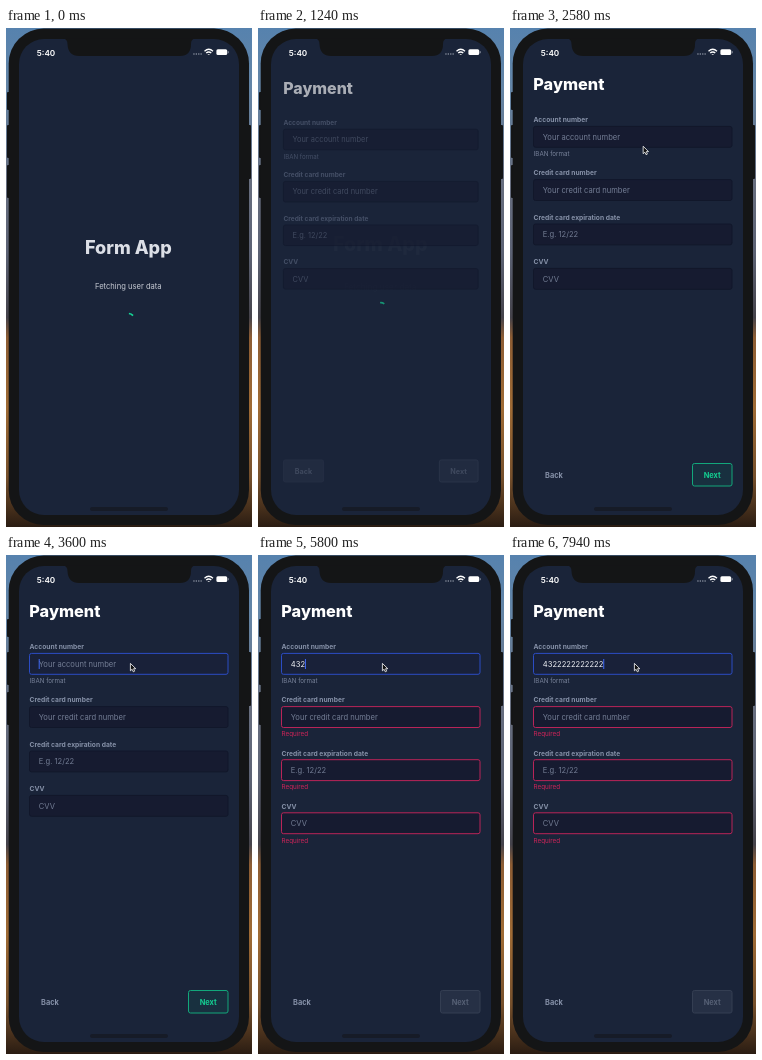
Animation of 246x499 px, one loop 8 s. Source, as an HTML page:

```html
<!DOCTYPE html>
<html lang="en">
<head>
<meta charset="utf-8">
<title>Payment form</title>
<style>
  html, body { margin: 0; width: 100%; height: 100%; overflow: hidden; background: #141516; }
  svg { display: block; width: 246px; height: 499px; font-family: Inter, "Open Sans", sans-serif; }
  #splash, #form { transform-origin: 123px 249px; }
  .spinner { fill: none; stroke: #14d596; stroke-width: 1.7; }
  .label { font-size: 6.7px; font-weight: 700; fill: #8691a8; }
  .box { fill: #161b30; stroke: #11172a; }
  .value { font-size: 7.6px; fill: #737d94; }
  .value.typed { fill: #f2f4f8; }
  .hint { font-size: 6.25px; fill: #78829a; }
  .error { font-size: 6.3px; fill: #cf2459; visibility: hidden; }
  .button { fill: #8691a8; stroke: transparent; --face: transparent; }
  .button text { font-size: 7.4px; font-weight: 700; text-anchor: middle; stroke: none; }
  .button rect { fill: var(--face); }
  .button.primary { fill: #14cf92; stroke: #12a77b; --face: #18303f; }
  .button.off { fill: #566075; stroke: #2b354a; --face: #263045; }
  .button.primary.off { stroke: #343e52; }
  .busy .label, .busy .hint { fill: #5d6880; }
  .busy .value { fill: #565f75; }
  .focus .box { fill: #192139; stroke: #2b4cc4; }
  .invalid .box { stroke: #b92458; }
  .invalid .error { visibility: visible; }
</style>
</head>
<body>
<svg viewBox="0 0 246 499">
  <defs>
    <linearGradient id="wall" x2="0" y2="1">
      <stop offset="0" stop-color="#5682ae"/>
      <stop offset=".12" stop-color="#6485a6"/>
      <stop offset=".3" stop-color="#686f80"/>
      <stop offset=".45" stop-color="#5c6274"/>
      <stop offset=".58" stop-color="#45434b"/>
      <stop offset=".62" stop-color="#8d5d34"/>
      <stop offset=".76" stop-color="#9f6b35"/>
      <stop offset=".9" stop-color="#76502c"/>
      <stop offset="1" stop-color="#2a1c12"/>
    </linearGradient>
    <clipPath id="screen"><rect x="13" y="11" width="220" height="476" rx="25"/></clipPath>
  </defs>

  <rect width="246" height="499" fill="url(#wall)"/>
  <g fill="#141516">
    <rect x="1" y="64" width="4" height="18" rx="1"/>
    <rect x="1" y="97" width="4" height="33" rx="1"/>
    <rect x="1" y="137" width="4" height="33" rx="1"/>
    <rect x="241" y="97" width="4" height="54" rx="1"/>
    <rect x="2.7" y=".5" width="240.3" height="496.5" rx="35"/>
  </g>

  <g clip-path="url(#screen)">
    <rect x="13" y="11" width="220" height="476" fill="#1a2439"/>
    <g id="splash" text-anchor="middle">
      <text x="122.3" y="225.5" font-size="18.1" font-weight="800" fill="#dcdfe6">Form App</text>
      <text x="122.3" y="260.6" font-size="7.6" fill="#c6cad3">Fetching user data</text>
      <path class="spinner"/>
    </g>
    <g id="form">
      <text x="23.3" y="62" font-size="16.3" font-weight="800" fill="#fff">Payment</text>
      <g id="fields"></g>
      <rect id="caret" y="104" width="1" height="10" fill="#3f68f5"/>
      <g id="back" class="button"><rect x="23.5" y="435.5" width="41" height="22.5" rx="2"/><text x="44" y="449.5">Back</text></g>
      <g id="next" class="button primary"><rect x="182.5" y="435.5" width="39.5" height="22.5" rx="2"/><text x="202.2" y="449.5">Next</text></g>
      <path class="spinner"/>
    </g>
    <rect x="84" y="479" width="78" height="4" rx="2" fill="#161b27"/>
  </g>

  <path d="M57 10.5Q61.5 11 61.5 16Q62 28 73 28H174Q185 28 185 16Q185 11 189 10.5Z" fill="#141516"/>
  <text x="30.8" y="27.6" font-size="8.2" font-weight="600" fill="#fff">5:40</text>
  <path d="M187.3 26H196" stroke="#7d8595" stroke-width="1.3" stroke-dasharray="1.3 1.1"/>
  <g fill="none" stroke="#fff" stroke-width="1.3">
    <path d="M198.5 23.2Q202.7 19.4 207 23.2M200.2 25.1Q202.7 22.9 205.3 25.1"/>
    <path d="M202 26.8L202.7 26.1L203.4 26.8" stroke-width="1"/>
  </g>
  <rect x="210.4" y="21.3" width="10.8" height="5.8" rx="1.5" fill="#fff"/>
  <path d="M222.2 23.2v2" stroke="#aeb4c0" stroke-width=".8"/>

  <path id="cursor" d="M0 0V7.4L1.7 5.9L2.9 8.4L4.2 7.8L3.2 5.3H5.4Z" fill="#111" stroke="#fff" stroke-width=".8"/>
</svg>
<script>
const LOOP = 8000;
const SHOW = 960, MOUNTED = 1190, READY = 2470, CLICK = 2980;
const KEYS = [5180, 5400, 5800, 5980, 6180, 6560, 6700, 6900, 7160, 7320, 7480, 7780, 7940];
const ACCOUNT = '43' + '2'.repeat(11);

const $ = id => document.getElementById(id);
const ramp = (t, from, to) => Math.min(1, Math.max(0, (t - from) / (to - from)));
const easeOut = p => 1 - (1 - p) ** 2;
const smooth = p => p * p * (3 - 2 * p);
const mix = (a, b, p) => a + (b - a) * p;
const show = (element, on) => { element.style.visibility = on ? 'visible' : 'hidden'; };

const FIELDS = [
  ['Account number', 'Your account number', 98],
  ['Credit card number', 'Your credit card number', 151.2],
  ['Credit card expiration date', 'E.g. 12/22', 195.6],
  ['CVV', 'CVV', 240]
];
$('fields').innerHTML = FIELDS.map(([label, hint, y], i) => `
  <g class="field" transform="translate(0 ${y})">
    <text class="label" x="23.5" y="-3.8">${label}</text>
    <rect class="box" x="23.5" y=".4" width="198.5" height="20.9" rx="2"/>
    <text class="value" x="32.8" y="13.7">${hint}</text>
    ${i ? '<text class="error" x="23.5" y="30.2">Required</text>'
        : '<text class="hint" x="23.7" y="30.2">IBAN format</text>'}
  </g>`).join('');

const fields = [...document.querySelectorAll('.field')];
const [splashSpinner, formSpinner] = document.querySelectorAll('.spinner');
const account = fields[0].querySelector('.value');

// The arc grows and shrinks around a centre that turns twice per 2400 ms.
function drawSpinner(path, cx, cy, age) {
  const phase = (Math.max(0, age) % 2400) / 1200;
  const half = 22 + 143 * smooth((phase > 1 ? 2 - phase : phase) ** 1.1);
  const middle = -90 + 360 * phase, r = 5.8;
  const point = deg => {
    const a = deg * Math.PI / 180;
    return `${cx + r * Math.cos(a)} ${cy + r * Math.sin(a)}`;
  };
  path.setAttribute('d', `M${point(middle - half)}A${r} ${r} 0 ${+(half > 90)} 1 ${point(middle + half)}`);
}

function drawTransition(t) {
  const p = easeOut(ramp(t, SHOW, SHOW + 500));
  $('splash').style.opacity = (1 - p) ** 2.3;
  $('splash').style.transform = `scale(${1 + 0.11 * p})`;
  $('form').style.opacity = p ** 2.2;
  $('form').style.transform = `scale(${0.9 + 0.1 * p})`;
  drawSpinner(splashSpinner, 122.5, 291.3, t + 90);
  drawSpinner(formSpinner, 122.8, 281, t - MOUNTED);
  show(splashSpinner, t < MOUNTED);
  show(formSpinner, t >= MOUNTED && t < READY);
}

function caretOpacity(t) {
  if (t < CLICK) return 0;
  if (t >= KEYS[0]) return 1;
  return 1 - ramp(t, 3600, 3840) + ramp(t, 4220, 4320) - ramp(t, 4780, 5040);
}

function drawForm(t) {
  const busy = t < READY, invalid = t >= KEYS[0];
  const typed = KEYS.filter(key => key <= t).length;
  $('form').classList.toggle('busy', busy);
  $('back').classList.toggle('off', busy);
  $('next').classList.toggle('off', busy || invalid);
  fields.forEach((field, i) => {
    const shift = invalid ? 8.7 * Math.max(0, i - 1) : 0;
    field.setAttribute('transform', `translate(0 ${FIELDS[i][2] + shift})`);
    field.classList.toggle('invalid', invalid && i > 0);
  });
  fields[0].classList.toggle('focus', t >= CLICK);
  account.classList.toggle('typed', typed > 0);
  account.textContent = typed ? ACCOUNT.slice(0, typed) : FIELDS[0][1];
  $('caret').setAttribute('x', 32.7 + (typed ? account.getComputedTextLength() : 0));
  $('caret').style.opacity = caretOpacity(t);
}

function drawCursor(t) {
  const p = smooth(ramp(t, 2400, 2960));
  show($('cursor'), t >= 2500);
  $('cursor').setAttribute('transform', `translate(${mix(136, 124.4, p)} ${mix(121.5, 108.4, p)})`);
}

function frame() {
  const t = performance.now() % LOOP;
  drawTransition(t);
  drawForm(t);
  drawCursor(t);
  requestAnimationFrame(frame);
}
frame();
</script>
</body>
</html>
```
